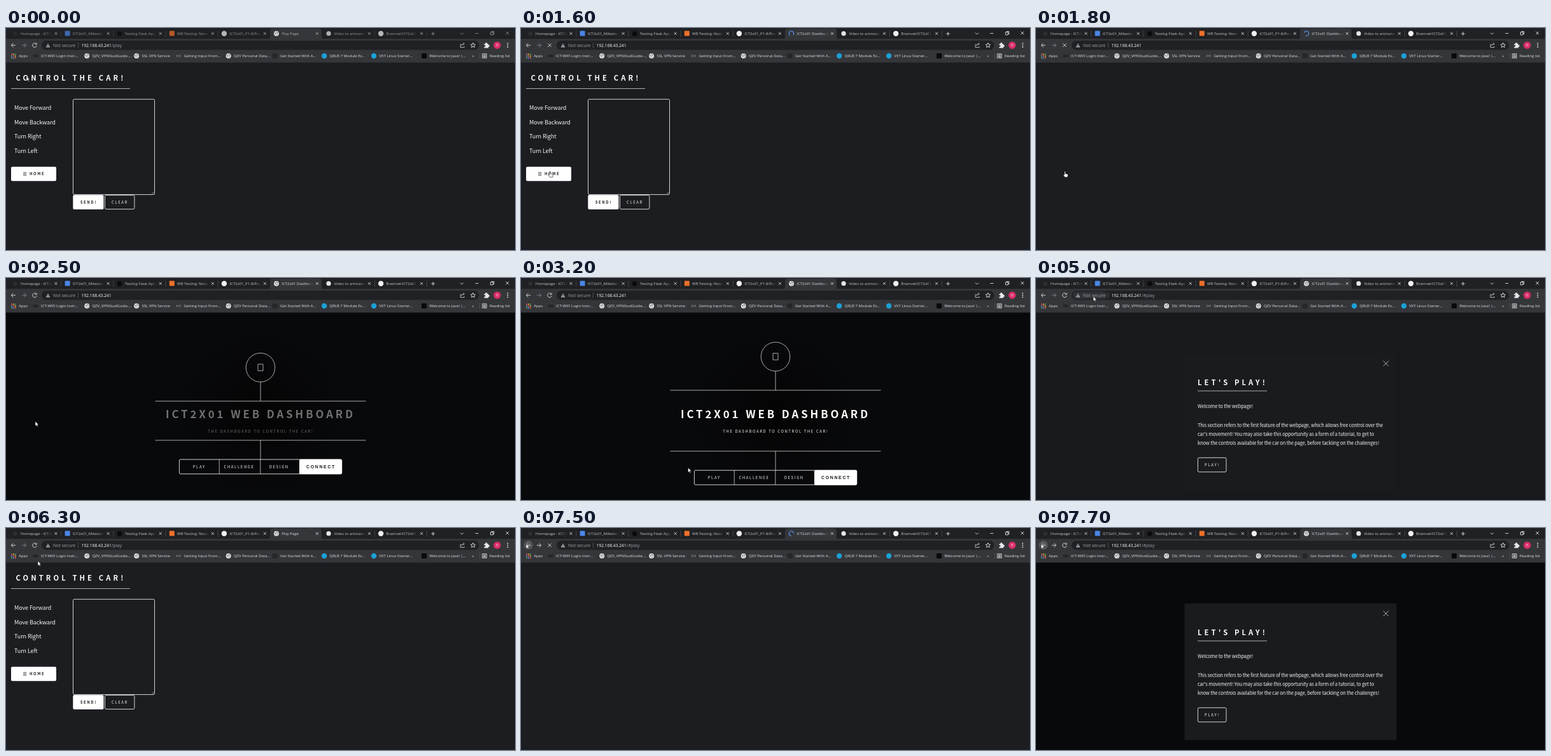
Recreate the animation shown at these times as an HTML page. Size 800x350 px, loop 8000 ms.

```html
<!DOCTYPE html>
<html lang="en">
<head>
<meta charset="utf-8">
<title>Car control dashboard</title>
<style>
  html, body { margin: 0; width: 100%; height: 100%; overflow: hidden; background: #1c1d21; }
  svg { display: block; }
  text { white-space: pre; }
  .ui { font: 6px "Open Sans", "Noto Sans", sans-serif; fill: #dfe1e5; }
  .url { font-size: 6.95px; }
  .page { font-family: "Noto Sans CJK JP", "Noto Sans CJK SC", "Noto Sans CJK", "Open Sans", sans-serif; fill: #f4f4f4; }
  .h1 { font-size: 16.8px; font-weight: 700; letter-spacing: 3.92px; fill: #fff; }
  .h2 { font-size: 11.2px; font-weight: 700; letter-spacing: 4.1px; fill: #fff; }
  .body { font-size: 7.47px; letter-spacing: -.126px; }
  .item { font-size: 9px; letter-spacing: -.1px; }
  .label { font-size: 5.98px; letter-spacing: 1.6px; }
  .dark { font-weight: 700; fill: #1b1f22; }
  .line { fill: none; stroke: #d4d4d5; stroke-width: .8; }
  .icon { fill: none; stroke: #dfe1e5; stroke-width: .9; }
</style>
</head>
<body>
<svg id="stage" width="800" height="350" viewBox="0 0 800 350"></svg>
<script>
const LOOP = 8000;
const STRIP = '#202124', BAR = '#35363a', PAGE = '#1c1d21';

const rect = (x, y, w, h, fill, extra = '') =>
  `<rect x="${x}" y="${y}" width="${w}" height="${h}" fill="${fill}" ${extra}/>`;
const dot = (x, y, r, fill, extra = '') => `<circle cx="${x}" cy="${y}" r="${r}" fill="${fill}" ${extra}/>`;
const path = (d, cls = 'line', extra = '') => `<path d="${d}" class="${cls}" ${extra}/>`;
const text = (x, y, cls, str, extra = '') => `<text x="${x}" y="${y}" class="${cls}" ${extra}>${str}</text>`;
const group = (id, content) => `<g id="${id}">${content}</g>`;
const square = (x, y, fill) => rect(x - 4, y - 4, 8, 8, fill, 'rx="1"');
const cross = (x, y, r) => `M${x - r} ${y - r}l${2 * r} ${2 * r}m0 ${-2 * r}l${-2 * r} ${2 * r}`;
const globe = (x, y) => dot(x, y, 4, '#e4e6e8') +
  path(`M${x - 3} ${y - 1.4}l2.4 1.2l-.6 1.8M${x + .4} ${y - 3.2}l.4 1.8l2.2 .6M${x + .6} ${y + 2.6}l1.4 -1.4`, 'icon', 'style="stroke:#4a4c50"');
const outline = (x, y, w, h, extra = '') => rect(x, y, w, h, 'none', `rx="2" stroke="#e8e8e8" stroke-width=".9" ${extra}`);

// Browser tabs
const TAB = 82.1;
const tabs = [
  ['Homepage - ICT2x01', x => dot(x, 9, 3, '#2f3033')],
  ['ICT2x01_Milestone', x => square(x, 8.5, '#4a86e8')],
  ['Testing Flask App', x => dot(x, 9, 4, '#0c0c0e')],
  ['WB Testing: Noved', x => square(x, 8.5, '#f0702a')],
  ['ICT2x01_P1-8/Readme', x => dot(x, 8.7, 4.2, '#f1f1f1')],
  ['', () => ''],
  ['Video to animated', x => dot(x, 8.7, 3.6, '#e6e6ea')],
  ['Bramvel/ICT2x01_', x => dot(x, 8.7, 4.2, '#f1f1f1')]
];

function tab([title, icon], i) {
  const x = 14.5 + i * TAB, active = i === 5;
  const sep = i === 4 || active ? '' : rect(x + 72, 4, .6, 10, '#5a5c60');
  return icon(x) +
    `<svg x="${x + 8.3}" y="0" width="49" height="17">` +
    text(0, 11, 'ui', title, active ? 'id="title"' : 'style="fill:#c3c6ca"') +
    rect(40, 0, 9, 17, `url(#${active ? 'fadeBar' : 'fadeStrip'})`) + '</svg>' +
    path(cross(x + 64, 8.7, 2), 'icon') + sep;
}

const dimIcon = x => rect(x - 4, 42, 8, 4, '#242528', 'rx="1"');
const bookmarks = [
  [55, 'ICT-WIFI Login Instr...', dimIcon],
  [135.5, 'QZV_VPNStudGuide....', x => globe(x, 44)],
  [213.5, 'SSL VPN Service', x => globe(x, 44)],
  [279.5, 'Getting Input From...', x => path(`M${x - 2} 42q-2 2 0 4m4 -4q2 2 0 4`, 'icon', 'opacity=".5"') + dot(x, 44, 1, '#8b8d90')],
  [358, 'QZV Personal Data...', x => globe(x, 44)],
  [431, 'Get Started With A...', x => square(x, 44, '#26272a')],
  [508.5, 'QRLB 7 Module Ex...', x => dot(x, 44, 4.2, '#1ba0d7')],
  [586.5, 'VXT Linux Starter...', x => dot(x, 44, 4.2, '#1ba0d7')],
  [665.5, 'Welcome to Java! |...', x => square(x, 44, '#08090a')]
];

const appDots = [0, 1, 2, 3, 4, 5, 6, 7, 8].map(i =>
  rect(8 + i % 3 * 2.9, 40.5 + Math.floor(i / 3) * 2.9, 1.9, 1.9, ['#e8544a', '#f2b632', '#46a35e', '#5a8fee'][i % 4])).join('');

const browser =
  rect(0, 0, 800, 17.5, STRIP) + rect(0, 17, 800, 37.5, BAR) +
  path('M411 17.5q4 0 4 -4V5q0 -4 4 -4H492q4 0 4 4v8.5q0 4 4 4z', '', `fill="${BAR}"`) +
  group('tabText', tabs.map(tab).join('')) +
  group('favicon', globe(425, 8.7)) +
  path('M425 5a3.7 3.7 0 1 1 -3.7 3.7', 'icon', 'id="spinner" style="stroke:#5b93f0;stroke-width:1.2"') +
  group('windowIcons',
    path('M668.2 9h6m-3 -3v6M714 7.5l2.5 2.5 2.5 -2.5M737.5 8.5h5M761.5 6.8h4v4h-4zM763 6.8v-1.3h4v4h-1.4' + cross(788, 8, 2.4), 'icon')) +
  dot(11.5, 27, 7.2, '#55575b', 'id="backHover"') +
  path('M15 27.2H8.2m3.2 -3.2l-3.2 3.2 3.2 3.2', 'icon') +
  path('M24.8 27.2h6.8m-3.2 -3.2l3.2 3.2 -3.2 3.2', 'icon', 'id="forward"') +
  group('reload', path('M47.6 25.2a3.3 3.3 0 1 0 .6 2.8M48.2 23.6v2.3h-2.4', 'icon')) +
  path(cross(45, 27.2, 2.7), 'icon', 'id="stop"') +
  rect(56, 20, 687.5, 14.5, STRIP, 'rx="7.2"') +
  rect(58, 21.5, 54, 11.5, '#303236', 'rx="5.7" id="secureHover"') +
  group('secure', path('M66 24.2l3.4 6.2h-6.8z', '', 'fill="#a4a8ad"') + rect(65.6, 26.3, .8, 2, STRIP) +
    rect(65.6, 28.8, .8, .8, STRIP) + text(74, 30, 'ui url', 'Not secure', 'style="fill:#a0a4a9"')) +
  rect(113, 23, .6, 8.5, '#6b6e72') +
  text(118.5, 30, 'ui url', '192.168.43.241', 'style="letter-spacing:-.16px;fill:#f1f3f4"') +
  text(166, 30, 'ui url', '', 'id="hash" style="fill:#9aa0a6"') +
  path('M716 26h-1.8v4.6h6V29M716.2 28q.4 -3 3.8 -3m-1.4 -1.7l1.8 1.7 -1.8 1.7', 'icon', 'opacity=".85"') +
  path('M734 23.4l1.1 2.5 2.7 .2 -2.1 1.8 .7 2.7 -2.4 -1.5 -2.4 1.5 .7 -2.7 -2.1 -1.8 2.7 -.2z', 'icon') +
  path('M751.6 25h2a1.4 1.4 0 1 1 2.6 0h2v2a1.3 1.3 0 1 1 0 2.4v2h-6.6v-2.2a1.3 1.3 0 1 0 0 -2.2z', '', 'fill="#e8eaed"') +
  dot(772, 27.2, 5.7, '#dc2c68') + text(770, 29.3, 'ui', 'B') +
  [24.2, 27.2, 30.2].map(y => dot(788.5, y, .9, '#e8eaed')).join('') +
  appDots + text(20, 46.3, 'ui', 'Apps') +
  bookmarks.map(([x, name, icon]) => icon(x - 8.3) + text(x, 46.3, 'ui', name)).join('') +
  text(732.5, 46, 'ui', '»') + rect(744.5, 39, .6, 10, '#606266') +
  path('M748.7 40.7h6.6v6.6h-6.6zM750 42.7h4m-4 1.4h4m-4 1.4h4', 'icon') + text(760, 46.3, 'ui', 'Reading list');

// Page with the car controls
const commands = ['Move Forward', 'Move Backward', 'Turn Right', 'Turn Left'];
const playPage =
  text(15.5, 83, 'page h2', 'CONTROL THE CAR!') + path('M8 95.5H195') +
  commands.map((name, i) => text(13, 129.3 + i * 22.4, 'page item', name)).join('') +
  outline(105.5, 112.3, 128, 150.3) + path('M229 261.5l3.5 -3.5m-1.5 3.5l1.5 -1.5', 'line', 'opacity=".7"') +
  rect(8, 218.7, 71, 22.6, '#fff', 'rx="2"') +
  path('M27 227.8h5.2m-5.2 2.2h5.2m-5.2 2.2h5.2', 'line', 'style="stroke:#1b1f22"') +
  text(37, 232.2, 'page label dark', 'HOME') +
  rect(105.3, 263.2, 48.2, 22.7, '#fff', 'rx="2"') + text(116.7, 276.8, 'page label dark', 'SEND!') +
  outline(155.5, 263.6, 46.4, 22) + text(166, 276.8, 'page label', 'CLEAR');

// Landing header
const navLabels = [[293.7, 'PLAY'], [342.5, 'CHALLENGE'], [413.8, 'DESIGN']];
const header =
  group('logo', dot(400, -53, 22.8, 'none', 'class="line"') + path('M400 -30V0M396 -58.3h8v10.4h-8z')) +
  path('M234.5 0H565.5', 'line', 'id="topLine"') +
  group('intro', text(251, 220.7, 'page h1', 'ICT2X01 WEB DASHBOARD') +
    text(317.3, 244.2, 'page label', 'THE DASHBOARD TO CONTROL THE CAR!')) +
  group('nav', path('M234.5 0H565.5M400 0V30') + rect(272.5, 30, 62.5, 23, '#fff', 'id="navHover" opacity=".09"') +
    outline(272.4, 30.2, 255.4, 22.8) + path('M335.2 30v23M399.8 30v23') +
    rect(461, 29.8, 67, 23.6, '#fff', 'rx="2"') +
    navLabels.map(([x, name]) => text(x, 43.9, 'page label', name)).join('') +
    text(472, 44.1, '', 'CONNECT', 'style="font:700 6.94px \'Liberation Sans\',Arial,sans-serif;letter-spacing:1.67px" fill="#16191c"'));

// Article panel
const lines = [
  [204.8, 'Welcome to the webpage!'],
  [235, 'This section refers to the first feature of the webpage, which allows free control over the'],
  [248.8, "car's movement! You may also take this opportunity as a form of a tutorial, to get to"],
  [262.5, 'know the controls available for the car on the page, before tackling on the challenges!']
];
const article =
  rect(233.4, 118.8, 333.2, 215.7, '#1a1b1f', 'rx="2"') + path(cross(550, 134.8, 4.2)) +
  text(254, 169.2, 'page h2', "LET'S PLAY!") + path('M254 178H363') +
  lines.map(([y, str]) => text(254, y, 'page body', str)).join('') +
  rect(254.2, 283, 45, 23, '#fff', 'rx="2" opacity=".08" id="playHover"') +
  outline(254.4, 283.3, 44.6, 22.5) + text(265, 296.8, 'page label', 'PLAY!');

const fade = (id, color) => `<linearGradient id="${id}"><stop stop-color="${color}" stop-opacity="0"/><stop offset="1" stop-color="${color}"/></linearGradient>`;

document.getElementById('stage').innerHTML =
  `<defs>${fade('fadeBar', BAR)}${fade('fadeStrip', STRIP)}
   <radialGradient id="shade" gradientUnits="userSpaceOnUse" cx="400" cy="215" r="130">
   <stop stop-color="#040405"/><stop offset="1" stop-color="#040405" stop-opacity="0"/></radialGradient></defs>` +
  rect(0, 54, 800, 296, PAGE, 'id="back"') + rect(0, 54, 800, 296, 'url(#shade)', 'id="vignette"') +
  group('playPage', playPage) + group('header', header) + group('article', article) + browser +
  group('cursor',
    path('M0 0V7.6l1.8 -1.6 1.2 2.6 1.2 -.6 -1.2 -2.5h2.4z', '', 'id="arrow" fill="#fff" stroke="#000" stroke-width=".5"') +
    path('M-.8 .6q.8 -1 1.6 0v3l3.4 .8q.8 .4 .6 1.4l-.7 3.4h-4.2l-2.6 -3.4q.4 -1.2 1.9 -.2z', '', 'id="hand" fill="#fff" stroke="#000" stroke-width=".6"'));

const $ = Object.fromEntries([...document.querySelectorAll('[id]')].map(e => [e.id, e]));

// Steps: start time, then values
const pointer = [
  [0, 32, 76], [200, 38, 135], [300, 44, 196], [500, 46, 208], [600, 47, 218], [700, 45.5, 226, 1],
  [1900, 46, 226], [3200, 262.5, 299], [3400, 290, 308, 1], [3500, 305, 308, 1],
  [4600, 174, 172], [4900, 130, 90], [5000, 90, 29], [5300, 150, 120], [5400, 225, 240],
  [5500, 260, 304, 1], [5600, 264, 291, 1], [5900, 262, 277], [6100, 84, 80],
  [6300, 50, 52], [6500, 22, 36], [6700, 12, 29], [7000, 8, 25]
];
const hashes = [[0, '/play'], [1400, ''], [3600, '/#play'], [6100, '/play'], [7500, '/#play']];
const titles = [[0, 'Play Page'], [1500, 'ICT2x01 Dashboard'], [6100, 'Play Page'], [7500, 'ICT2x01 Dashboard']];
const views = [[0, 'play'], [1800, 'blank'], [1900, 'home'], [6300, 'play'], [7500, 'blank'], [7600, 'home']];
const loads = [[1400, 2000], [5800, 6300], [7300, 7600]];

const at = (steps, t) => steps.filter(s => s[0] <= t).pop();
const ramp = (t, from, to) => Math.min(1, Math.max(0, (t - from) / (to - from)));
const between = (t, from, to) => t >= from && t < to;
const show = (el, on) => { el.style.display = on ? '' : 'none'; };
const mix = (a, b, p) => `rgb(${a.map((v, i) => Math.round(v + (b[i] - v) * p))})`;

// CSS "ease": cubic-bezier(.25, .1, .25, 1)
function ease(p) {
  let lo = 0, hi = 1;
  for (let i = 0; i < 20; i++) {
    const s = (lo + hi) / 2, x = .75 * s * (1 - s) * (1 - s) + .75 * s * s * (1 - s) + s * s * s;
    if (x < p) lo = s; else hi = s;
  }
  return .3 * lo * (1 - lo) * (1 - lo) + 3 * lo * lo * (1 - lo) + lo ** 3;
}

function drawBrowser(t) {
  const loading = loads.some(([a, b]) => between(t, a, b));
  const focused = t >= 1200;
  show($.spinner, loading);
  show($.favicon, !loading);
  show($.stop, loading);
  show($.reload, !loading);
  $.spinner.setAttribute('transform', `rotate(${t * .36 % 360} 425 8.7)`);
  $.title.textContent = at(titles, t)[1];
  $.hash.textContent = at(hashes, t)[1];
  $.tabText.setAttribute('opacity', focused ? 1 : .72);
  $.windowIcons.setAttribute('opacity', focused ? 1 : .55);
  $.forward.setAttribute('opacity', t >= 7500 ? 1 : .45);
  show($.backHover, t >= 6700);
  show($.secureHover, between(t, 5000, 5300));
}

function drawPage(t) {
  const view = at(views, t)[1], home = view === 'home';
  const lift = t < 6300 ? ramp(t, 3850, 4900) : 0;
  const out = ease(ramp(t, 3820, 4250));
  const half = (46 * ramp(t, 2180, 2350) + 50 * ease(ramp(t, 2355, 3055))) / 2;
  $.back.setAttribute('fill', home ? mix([8, 9, 11], [23, 25, 29], lift) : PAGE);
  show($.vignette, home && t < 6300);
  $.vignette.setAttribute('opacity', 1 - lift);
  show($.playPage, view === 'play');

  show($.header, home && out < 1);
  $.header.setAttribute('opacity', 1 - out);
  $.header.setAttribute('transform', `translate(400 214) scale(${1 - .05 * out}) translate(-400 -214)`);
  $.logo.setAttribute('transform', `translate(0 ${225 - half})`);
  $.topLine.setAttribute('transform', `translate(0 ${225 - half})`);
  $.nav.setAttribute('transform', `translate(0 ${225 + half})`);
  $.intro.setAttribute('opacity', ramp(t, 2290, 2790));
  show($.navHover, between(t, 3400, 4600));

  const shown = t < 6300 ? ease(ramp(t, 4350, 4600)) : ramp(t, 7500, 7700);
  show($.article, home && shown > 0);
  $.article.setAttribute('opacity', shown);
  $.article.setAttribute('transform', `translate(0 ${2 * (1 - shown)})`);
  show($.playHover, between(t, 5500, 5900));
}

function draw() {
  const t = performance.now() % LOOP;
  const [, x, y, hand] = at(pointer, t);
  drawBrowser(t);
  drawPage(t);
  $.cursor.setAttribute('transform', `translate(${x} ${y})`);
  show($.hand, hand);
  show($.arrow, !hand);
  requestAnimationFrame(draw);
}
draw();
</script>
</body>
</html>
```
